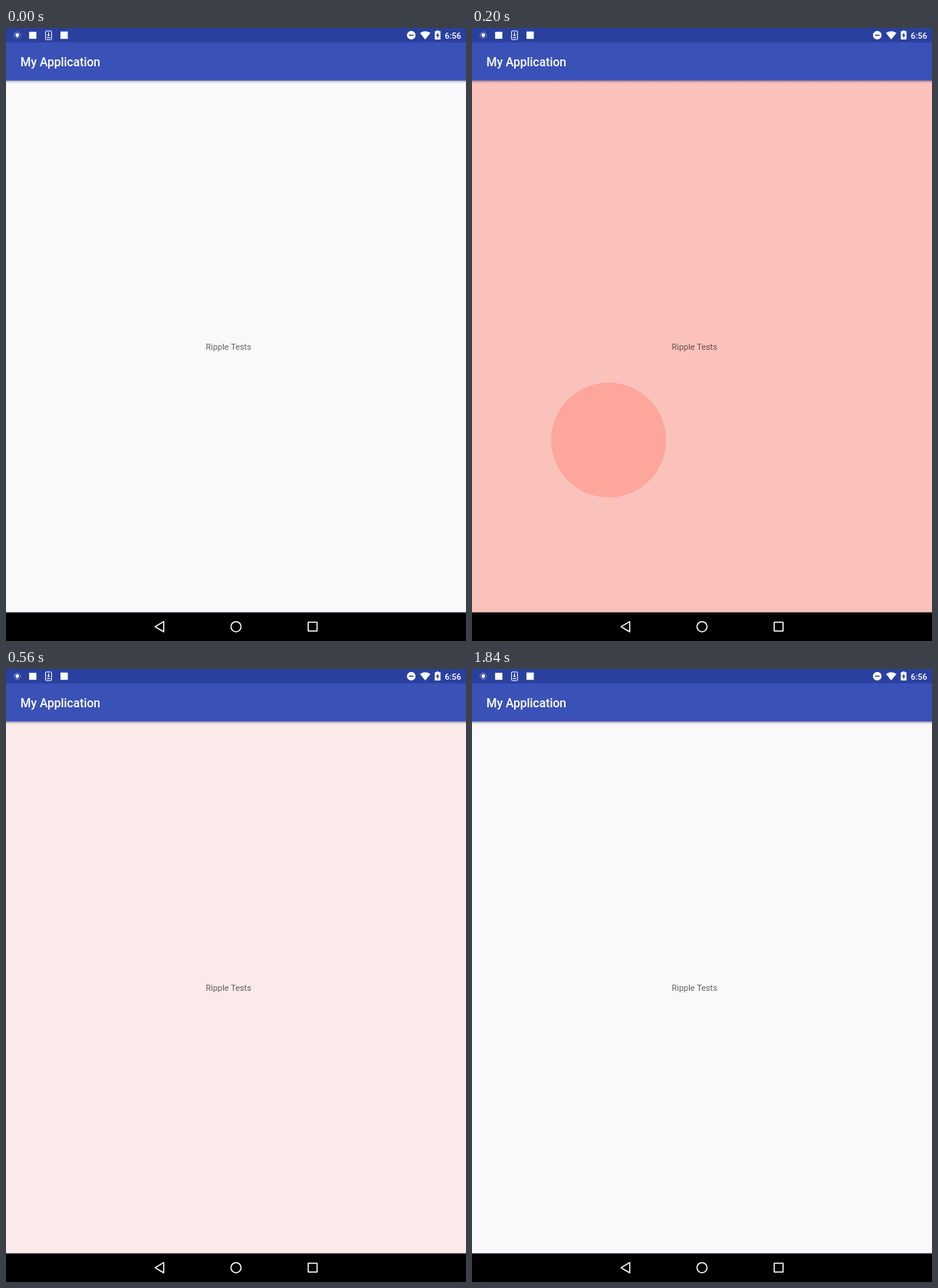
Write an HTML page that moves like this. It is 600 px wide and 800 px high and loops after 1880 ms.

```html
<!DOCTYPE html>
<html lang="en">
<head>
<meta charset="utf-8">
<title>Ripple</title>
<style>
  html, body { margin: 0; height: 100%; overflow: hidden; background: #f9f8fa; }
  svg { display: block; width: 100vw; height: 100vh; }
  text { font-family: Roboto, sans-serif; }
</style>
</head>
<body>
<svg viewBox="0 0 600 800">
  <defs>
    <linearGradient id="shadow" x2="0" y2="1">
      <stop offset="0" stop-opacity=".34"/>
      <stop offset=".4" stop-opacity=".13"/>
      <stop offset="1" stop-opacity="0"/>
    </linearGradient>
  </defs>

  <rect width="600" height="800" fill="#f9f8fa"/>
  <g fill="#ff4228">
    <rect id="wash" y="68" width="600" height="695" opacity="0"/>
    <circle id="ripple" opacity="0"/>
  </g>
  <text x="260.5" y="420" font-size="10.94" fill-opacity=".6">Ripple Tests</text>

  <!-- App bar -->
  <rect y="68.6" width="600" height="4" fill="url(#shadow)"/>
  <rect width="600" height="68.7" fill="#3a51b7"/>
  <rect width="600" height="18.7" fill="#2a409f"/>
  <text x="18.8" y="50" font-size="15.63" font-weight="500" fill="#fff">My Application</text>

  <!-- Status icons -->
  <g fill="#fff">
    <circle cx="14.7" cy="9.4" r="4.1" fill="none" stroke="#fff" stroke-width=".8" stroke-opacity=".65" stroke-dasharray="1.5 .7"/>
    <path d="M12.5 7.6l2.2-.8 2.2.8v1.8q-.3 2-2.2 2.8q-1.9-.8-2.2-2.8z"/>
    <rect x="30.2" y="4.9" width="9.4" height="9.2"/>
    <rect x="51.6" y="3.9" width="7.8" height="11.2" rx=".8" fill="none" stroke="#fff"/>
    <path d="M55 5.8h1v3h1.6l-2.1 2.3-2.1-2.3H55zM53.3 12h4.4v1h-4.4z"/>
    <rect x="71" y="4.6" width="9.6" height="9.6"/>
    <circle cx="528.6" cy="9.4" r="5.6"/>
    <path d="M525.6 8.7h6v1.5h-6z" fill="#2a409f"/>
    <path d="M540 6.5q6.8-4.6 13.6 0l-6.8 8.4z"/>
    <path d="M561.5 4.2V3.2h3v1h2.2v10.9h-7.4V4.2z"/>
    <path d="M563.6 5.8v3h1.7l-2.8 5v-3.6h-1.8z" fill="#2a409f"/>
    <text x="572.2" y="13.6" font-size="10.94" font-weight="500">6:56</text>
  </g>

  <!-- Navigation bar -->
  <rect y="762.6" width="600" height="37.4"/>
  <g fill="none" stroke="#fff" stroke-width="1.5" stroke-linejoin="round">
    <path d="M194.4 781.3l11.3-6.7v13.4z"/>
    <circle cx="300" cy="781.3" r="6.6"/>
    <rect x="394.2" y="775.6" width="11.5" height="11.5"/>
  </g>
</svg>

<script>
const LOOP = 1880, STEP = 40;
const PEAK = 0.313;              // opacity of a fully lit layer
const TAP = 87;                  // release time, when the circle starts
const CENTER = { x: 300, y: 416 };
const OFFSET = 169.2;            // touch point's distance from the center on each axis
const RADIUS = 108;

const wash = document.getElementById('wash');
const ripple = document.getElementById('ripple');
const clamp = v => Math.min(1, Math.max(0, v));
const decelerate = v => 1 - 400 ** (-1.4 * clamp(v));

function set(node, attrs) {
  for (const name in attrs) node.setAttribute(name, attrs[name]);
}

function draw(t) {
  const fadeIn = (t - 57) / 104, fadeOut = (682 - t) / 515;
  set(wash, { opacity: PEAK * clamp(Math.min(fadeIn, fadeOut)) });

  const age = t - TAP;
  const offset = OFFSET * (1 - 0.3 * decelerate(age / 350));
  set(ripple, {
    cx: CENTER.x - offset,
    cy: CENTER.y + offset,
    r: RADIUS * decelerate(age / 800),
    opacity: age > 0 ? PEAK * clamp(1 - age / 368) : 0
  });
}

const start = performance.now();
function tick() {
  const t = (performance.now() - start) % LOOP;
  draw(Math.floor(t / STEP) * STEP);
  requestAnimationFrame(tick);
}
tick();
</script>
</body>
</html>
```
